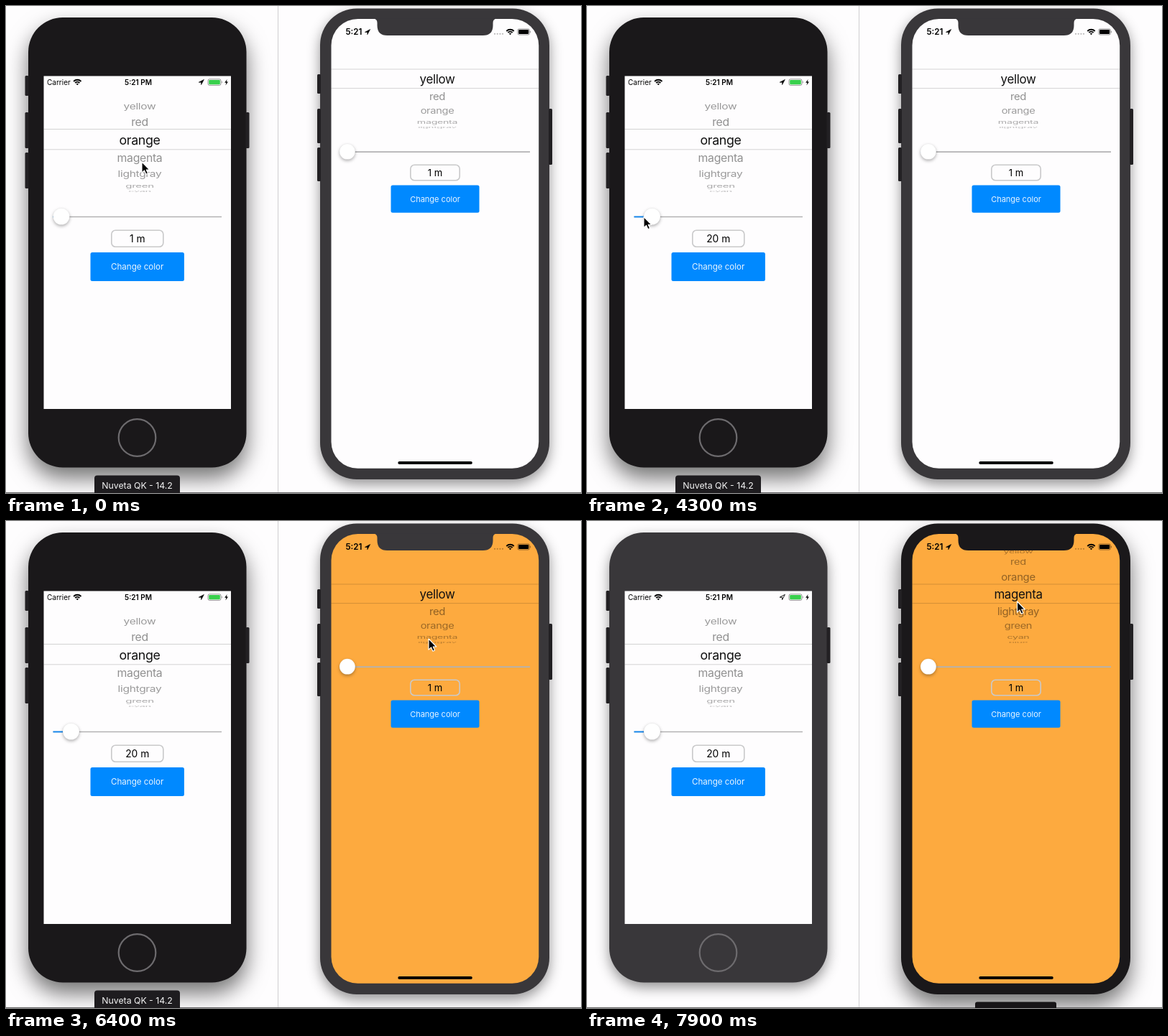
An HTML page for the animation above (8 s loop, 800 by 678 pixels).

```html
<!DOCTYPE html>
<html lang="en">
<head>
<meta charset="utf-8">
<title>Two phones</title>
<style>
html, body { margin: 0; width: 100%; height: 100%; overflow: hidden; background: #fefdfe; }
svg { display: block; width: 800px; height: 678px; font-family: Inter, "Liberation Sans", sans-serif; }
text { white-space: pre; }
.mid { text-anchor: middle; }
.bold { font-weight: 600; }
.body { fill: #39373a; filter: drop-shadow(0 7px 9px rgba(0,0,0,.42)); }
.active .body { fill: #1a181a; filter: drop-shadow(0 15px 15px rgba(0,0,0,.55)); }
.key { fill: #222023; }
.notch { fill: #39373a; }
.active .notch { fill: #1a181a; }
.tip { visibility: hidden; }
.active .tip { visibility: visible; }
.screen { fill: #fefdfe; }
.orange .screen { fill: #fdaa3f; }
.row { text-anchor: middle; letter-spacing: -.02em; }
.big { fill: #111; }
.rule { stroke: #000; stroke-opacity: .17; }
.track { stroke: #b2b2b3; stroke-width: 1.7; }
.fill { stroke: #0a84f0; stroke-width: 1.8; }
.thumb { fill: #fff; stroke: rgba(0,0,0,.07); stroke-width: .6; filter: drop-shadow(0 2px 2px rgba(0,0,0,.3)); }
.field { fill: none; stroke: #c9c9ca; stroke-width: 1.6; }
.button { fill: #0089ff; }
.label { fill: #eaf5ff; }
.pin { stroke: #000; stroke-width: .6; stroke-linejoin: round; }
.hollow { fill: none; stroke-width: .9; }
</style>
</head>
<body>
<svg viewBox="0 0 800 678">
  <g id="left"></g>
  <g id="right"></g>
  <path d="M378.5 0V678" stroke="#cfced0"/>
  <path d="M0 677.5H800" stroke="#69686a"/>
  <g id="tips"></g>
  <path id="cursor" d="M0 0V15.2L3.5 11.9L5.9 17.2L8.5 16L6.2 11H10.8Z" stroke="#fff" stroke-width="1.1" stroke-linejoin="round"/>
</svg>
<script>
const LOOP = 8000, STEP = 100, ROW_ANGLE = 20.5 * Math.PI / 180;
const COLORS = ['yellow', 'red', 'orange', 'magenta', 'lightgray', 'green', 'cyan', 'blue', 'black'];
const $ = id => document.getElementById(id);

const rect = (cls, x, y, w, h, r = 0) =>
  `<rect class="${cls}" x="${x}" y="${y}" width="${w}" height="${h}" rx="${r}"/>`;
const text = (cls, x, y, size, s) =>
  `<text class="${cls}" x="${x}" y="${y}" font-size="${size}">${s}</text>`;
const line = (cls, x1, x2, y) => `<path class="${cls}" d="M${x1} ${y}H${x2}"/>`;
const pin = (x, y) =>
  `<path class="pin" transform="translate(${x} ${y})" d="M3.6 -3.6L-3.6 .2H-.2V3.6Z"/>`;
const wifi = (x, y) => `<g transform="translate(${x} ${y})">
  <path d="M-5.2 -1.2A7.3 7.3 0 0 1 5.2 -1.2M-3.1 .9A4.4 4.4 0 0 1 3.1 .9" fill="none" stroke="#000" stroke-width="1.9"/>
  <path d="M0 4L-1.7 2.3A2.4 2.4 0 0 1 1.7 2.3Z"/></g>`;

function battery(x, y, w, h, color) {
  return `<rect x="${x}" y="${y}" width="${w}" height="${h}" rx="2.2" fill="none" stroke="#000" stroke-opacity=".5" stroke-width=".8"/>
    <rect x="${x + 1.2}" y="${y + 1.2}" width="${w - 2.4}" height="${h - 2.4}" rx="1.2" fill="${color}"/>
    <path d="M${x + w + 1} ${y + h / 2 - 1.5}q1.6 1.5 0 3z" fill-opacity=".6"/>`;
}

// Picker wheel: small rows wrap a cylinder, the band shows a flat magnified copy.
function picker(p) {
  const { id, x1, x2, cy, band: [top, bottom] } = p.wheel;
  const rows = cls => COLORS.map(c => `<text class="row ${cls}">${c}</text>`).join('');
  const w = x2 - x1;
  return `<clipPath id="${id}In">${rect('', x1, top, w, bottom - top)}</clipPath>
    <clipPath id="${id}Out">${rect('', x1, cy - 90, w, top - cy + 90)}${rect('', x1, bottom, w, 90)}</clipPath>
    <g clip-path="url(#${id}Out)">${rows('small')}</g>
    <g clip-path="url(#${id}In)">${rows('big')}</g>
    ${line('rule', x1, x2, top)}${line('rule', x1, x2, bottom)}`;
}

function controls(p) {
  const { track, field, button, cx, size } = p;
  return picker(p) +
    line('track', track.x1, track.x2, track.y) +
    `<path class="fill"/><circle class="thumb" cy="${track.y - .5}" r="${track.r}"/>` +
    rect('field', ...field, 5.5) +
    text('mid value', cx, field[1] + field[3] / 2 + size * .36, size, '') +
    rect('button', ...button, 2.5) +
    text('mid label', cx, button[1] + button[3] / 2 + size * .3, size * .84, 'Change color');
}

const LEFT = {
  node: $('left'), cx: 182.7, size: 13.8,
  wheel: { id: 'l', x: 186, x1: 52.5, x2: 313, cy: 187, band: [171.5, 199.8], radius: 72, gap: 28.3, big: 17.8, small: 15.9 },
  track: { x1: 65.5, x2: 300, y: 293.5, r: 11.5 },
  field: [146.8, 312.3, 72, 22.9], button: [117.5, 343, 130.4, 40]
};
const RIGHT = {
  node: $('right'), cx: 597, size: 13.1,
  wheel: { id: 'r', x: 600, x1: 452.5, x2: 741, cy: 102, band: [88, 114.6], radius: 67.8, gap: 26.6, big: 16.9, small: 14.95 },
  track: { x1: 464, x2: 729, y: 203.2, r: 10.9 },
  field: [562.8, 221.2, 68.4, 21.5], button: [535.5, 249.5, 123, 38.3]
};

LEFT.node.innerHTML =
  rect('body', 31, 16, 303.5, 626.5, 48) +
  [[26.5, 97, 28], [26.5, 148, 50], [26.5, 204, 50], [333.5, 148, 50]]
    .map(([x, y, h]) => rect('key', x, y, 5, h, 1.5)).join('') +
  rect('screen', 52.5, 97.5, 260.5, 463.5) +
  '<circle cx="182.5" cy="601" r="25.8" fill="none" stroke="#6d6b6e" stroke-width="2.2"/>' +
  text('', 57, 110, 10, 'Carrier') + wifi(99.3, 106.2) +
  text('mid bold', 184, 110, 10, '5:21 PM') + pin(271.8, 106) +
  battery(281, 101.8, 18, 8.6, '#38d04c') +
  '<path d="M307.6 102L304.2 106.8H306.4L305.4 110.4L309 105.4H306.8Z"/>' +
  controls(LEFT);

RIGHT.node.innerHTML =
  rect('body', 437, 3.5, 319, 655.5, 51) +
  [[433, 95, 27], [433, 143, 48], [433, 197, 47], [755, 143, 78]]
    .map(([x, y, h]) => rect('key', x, y, 5, h, 1.5)).join('') +
  rect('screen', 452.5, 18, 288.7, 625.8, 37) +
  controls(RIGHT) +
  '<path class="notch" d="M511 17.5q5.500 .5 5.500 6v3.500q0 14 14 14h133q14 0 14 -14v-3.500q0 -5.500 5.500 -6z"/>' +
  text('bold', 472.5, 40, 11.6, '5:21') + pin(503, 36.2) +
  [680, 683.7, 687.4, 691].map(x => `<circle cx="${x}" cy="38.8" r="1.1" fill-opacity=".27"/>`).join('') +
  wifi(701.5, 36.2) + battery(711.8, 31.9, 16.6, 8.2, '#000') +
  rect('', 545.3, 634, 103.5, 3.9, 2);

$('tips').innerHTML =
  `<g id="leftTip"><g class="tip">${rect('', 123, 653.5, 119, 30, 4).replace('/>', ' fill="#1e1c1f"/>')}
   <text class="mid" x="182.5" y="671.800" font-size="12.3" fill="#f4f4f4">Nuveta QK - 14.2</text></g></g>
   <g id="rightTip"><g class="tip">${rect('', 540, 669.5, 113, 20, 3).replace('/>', ' fill="#171517"/>')}</g></g>`;

const CURSOR = [
  [0, 189, 217], [200, 183, 225], [900, 77, 292], [1100, 65.5, 294], [1500, 85, 294],
  [1900, 89, 294], [2400, 76, 294], [2800, 80, 294], [3300, 82, 294], [3800, 78, 294],
  [4200, 79, 293.5], [4700, 79, 293.5], [5300, 160, 355], [5500, 160, 355], [5600, 198, 341.5],
  [6400, 588, 164], [6500, 594.5, 156], [6700, 595, 156], [7300, 598.5, 112]
];
const GRAB = 1100, DROP = 4600, SEND = 5600, FOCUS = 6500, HOLLOW = 6900;

const clamp = v => Math.min(1, Math.max(0, v));
const smooth = u => u * u * (3 - 2 * u);

function cursorAt(t) {
  const i = CURSOR.findIndex(k => k[0] > t);
  if (i < 0) return CURSOR[CURSOR.length - 1].slice(1);
  const [t0, x0, y0] = CURSOR[i - 1], [t1, x1, y1] = CURSOR[i];
  const u = smooth((t - t0) / (t1 - t0));
  return [x0 + (x1 - x0) * u, y0 + (y1 - y0) * u];
}

function turnWheel({ node, wheel: w }, index) {
  const small = node.querySelectorAll('.small'), big = node.querySelectorAll('.big');
  COLORS.forEach((_, i) => {
    const k = i - index, angle = k * ROW_ANGLE, flat = Math.cos(angle);
    const size = w.small * (1 - .1 * (1 - flat));
    const seen = Math.abs(angle) < 1.5;
    const s = small[i], b = big[i];
    s.setAttribute('visibility', seen ? 'visible' : 'hidden');
    s.setAttribute('font-size', size);
    s.setAttribute('y', size * .35);
    s.setAttribute('fill-opacity', .225 * (1 + flat));
    s.setAttribute('transform', `translate(${w.x} ${w.cy + w.radius * Math.sin(angle)}) scale(1 ${Math.max(flat, .02)})`);
    b.setAttribute('font-size', w.big);
    b.setAttribute('x', w.x);
    b.setAttribute('y', w.cy + k * w.gap + w.big * .35);
  });
}

function slide({ node, track }, offset) {
  const x = track.x1 + track.r + offset;
  const travel = track.x2 - track.x1 - 2 * track.r;
  node.querySelector('.thumb').setAttribute('cx', x);
  node.querySelector('.fill').setAttribute('d', `M${track.x1} ${track.y}H${x}`);
  node.querySelector('.value').textContent = Math.round(1 + 299 * offset / travel) + ' m';
}

function draw(t) {
  const [x, y] = cursorAt(t);
  $('cursor').setAttribute('transform', `translate(${x} ${y})`);

  const held = Math.min(t, DROP);
  slide(LEFT, held < GRAB ? 0 : Math.max(0, cursorAt(held)[0] - 65.5));
  slide(RIGHT, 0);

  turnWheel(LEFT, 2);
  const drag = smooth(clamp((t - 6700) / 600)), glide = 1 - (1 - clamp((t - 7100) / 600)) ** 2;
  turnWheel(RIGHT, 1.7 * drag + 1.3 * glide);

  const swapped = t >= FOCUS;
  LEFT.node.classList.toggle('active', !swapped);
  $('leftTip').classList.toggle('active', !swapped);
  RIGHT.node.classList.toggle('active', swapped);
  $('rightTip').classList.toggle('active', swapped);
  RIGHT.node.classList.toggle('orange', t >= SEND);
  LEFT.node.querySelector('.pin').classList.toggle('hollow', t >= HOLLOW);
}

const start = performance.now();
function tick() {
  const t = (performance.now() - start) % LOOP;
  draw(Math.floor(t / STEP) * STEP);
  requestAnimationFrame(tick);
}
tick();
</script>
</body>
</html>
```
